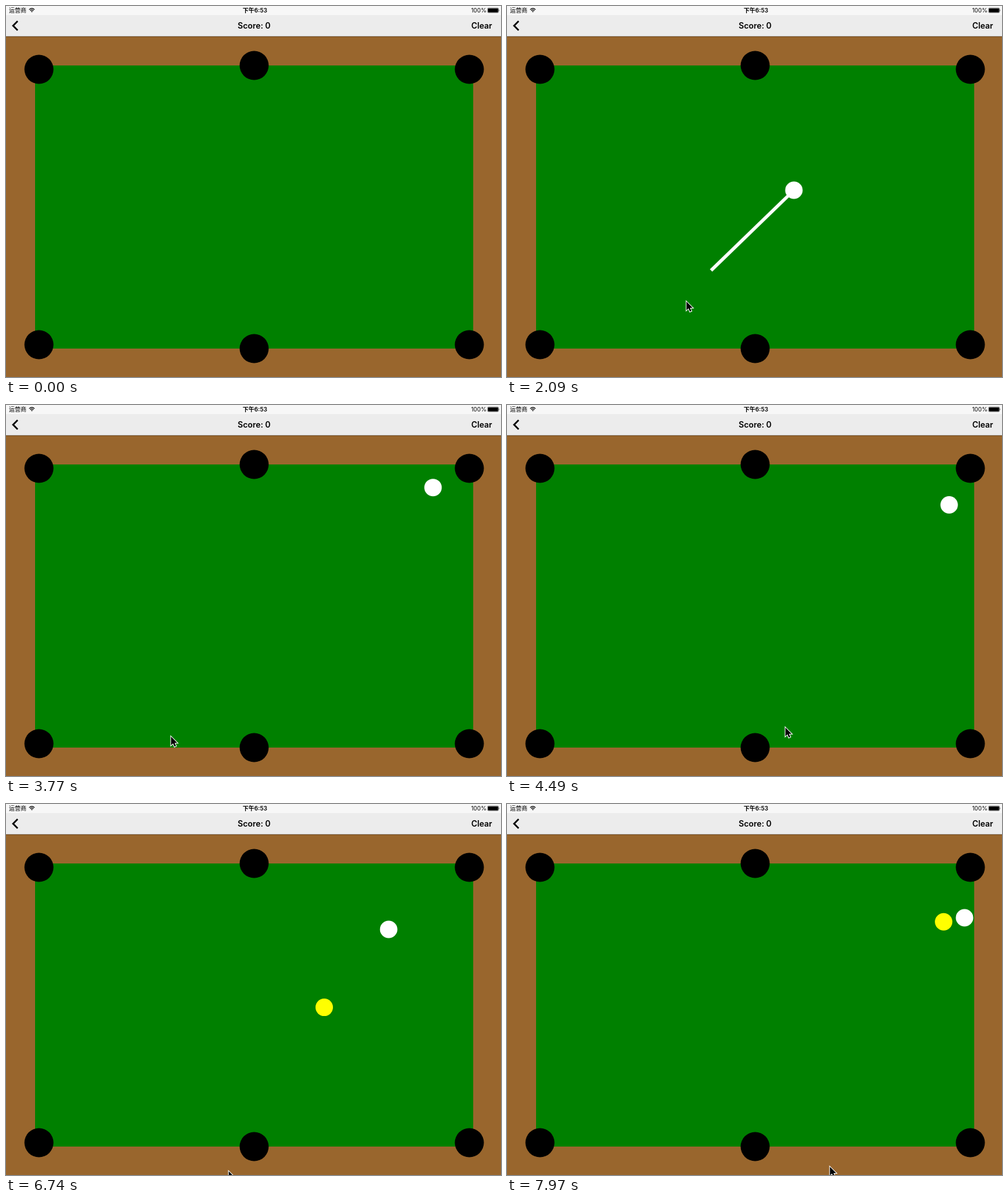
An HTML page with a canvas for the animation above (8 s loop, 766 by 574 pixels).

```html
<!DOCTYPE html>
<html lang="zh">
<head>
<meta charset="utf-8">
<title>Pool table</title>
<style>
  html, body { margin: 0; width: 766px; height: 574px; overflow: hidden; background: #99662d; }
  canvas, svg { position: absolute; left: 0; top: 0; display: block; }
  text { font-family: Inter, "Noto Sans CJK SC", "Noto Sans CJK", sans-serif; fill: #000; }
  .status { font-size: 9px; }
  .bar { font-size: 12.6px; font-weight: 600; }
</style>
</head>
<body>
<canvas id="stage" width="766" height="574"></canvas>
<svg width="766" height="48" viewBox="0 0 766 48">
  <rect width="766" height="14" fill="#f7f7f7"/>
  <rect y="14" width="766" height="33" fill="#ececec"/>
  <rect y="46.7" width="766" height="0.8" fill="#000" opacity="0.45"/>
  <text class="status" x="4.5" y="10">运营商</text>
  <g fill="none" stroke="#000" stroke-width="1.2">
    <path d="M35.8 5.6Q40 1.8 44.2 5.6"/>
    <path d="M37.4 7.3Q40 5 42.6 7.3"/>
  </g>
  <path d="M38.6 8.3Q40 7.2 41.4 8.3L40 9.8Z"/>
  <text class="status" x="385.3" y="10" text-anchor="middle" font-weight="600">下午6:53</text>
  <text class="status" x="743.5" y="10" text-anchor="end">100%</text>
  <rect x="745.3" y="3.1" width="16.8" height="7.2" rx="1.4" fill="none" stroke="#000" stroke-width="0.5"/>
  <rect x="745.9" y="3.7" width="15.6" height="6" rx="0.8"/>
  <path d="M762.6 5.3Q764.2 6.8 762.6 8.3Z"/>
  <path d="M18 23.3L10.9 30.5L18 37.7" fill="none" stroke="#000" stroke-width="2.5"/>
  <text class="bar" x="384" y="35" text-anchor="middle">Score: 0</text>
  <text class="bar" x="752.3" y="35" text-anchor="end">Clear</text>
</svg>
<script>
const ctx = document.getElementById('stage').getContext('2d');
const LOOP = 8, DAMPING = 0.13, CUE_LAG = 0.2, RADIUS = 13.5;
const ARROW = new Path2D('M.7 1.3V14.6L3.9 11.7L6.1 16.8L8.4 15.8L6.2 10.9H10.3Z');

const point = (t, x, y) => ({ t, x, y });

// turning points of the hand: approach, first aim, move away, second aim, leave
const pointer = [
  point(0.36, 586, 327), point(0.92, 441, 284),
  point(1.28, 441, 285), point(1.89, 316, 409), point(2.09, 277, 456), point(2.91, 252, 512),
  point(3.76, 252, 512), point(4.49, 430, 498), point(5.36, 484, 322),
  point(5.54, 484, 322), point(5.68, 453, 373), point(5.88, 380, 499), point(6.24, 344, 567),
  point(7.3, 344, 567), point(7.97, 499, 560)
];

// each path: the shot, then every place the ball hits something
const kiss = 6.93;
const balls = [
  { color: '#fff', shown: 1.28, path: [
    point(3.115, 444, 285), point(3.53, 597.3, 107.3), point(3.963, 710, 143.4),
    point(kiss, 585.6, 196.8), point(7.96, 708, 176)] },
  { color: '#ff0', shown: 5.52, path: [
    point(6.727, 487.5, 323), point(kiss, 558.5, 203),
    point(7.125, 603, 106.5), point(7.97, 675.7, 182.2)] }
];

const steady = s => s;
const rolled = s => 1 - Math.exp(-DAMPING * s);

function along(path, t, travel) {
  const next = path.findIndex(p => p.t > t);
  if (next < 0) return path[path.length - 1];
  if (next === 0) return path[0];
  const a = path[next - 1], b = path[next];
  const f = travel(t - a.t) / travel(b.t - a.t);
  return point(t, a.x + (b.x - a.x) * f, a.y + (b.y - a.y) * f);
}

function disc(x, y, r, color) {
  ctx.fillStyle = color;
  ctx.beginPath();
  ctx.arc(x, y, r, 0, Math.PI * 2);
  ctx.fill();
}

function drawTable() {
  ctx.fillStyle = '#99662d';
  ctx.fillRect(0, 0, 766, 574);
  ctx.fillStyle = '#008000';
  ctx.fillRect(45, 92, 678, 438);
  for (const col of [-1, 0, 1]) {
    for (const row of [-1, 1]) {
      disc(384 + col * 333, 311 + row * (col ? 213 : 219), 22.5, '#000');
    }
  }
}

function drawBall({ color, shown, path }, t) {
  if (t < shown) return;
  const ball = along(path, t, rolled);
  if (t < path[0].t) {
    // the cue trails the pointer
    const tip = along(pointer, Math.max(shown, t - CUE_LAG), steady);
    ctx.strokeStyle = '#fff';
    ctx.lineWidth = 5.2;
    ctx.beginPath();
    ctx.moveTo(ball.x, ball.y);
    ctx.lineTo(tip.x, tip.y);
    ctx.stroke();
  }
  disc(ball.x, ball.y, RADIUS, color);
}

function drawPointer(t) {
  if (t < pointer[0].t) return;
  const { x, y } = along(pointer, t, steady);
  ctx.save();
  ctx.translate(x, y);
  ctx.strokeStyle = '#fff';
  ctx.lineWidth = 2;
  ctx.stroke(ARROW);
  ctx.fillStyle = '#000';
  ctx.fill(ARROW);
  ctx.restore();
}

const start = performance.now();
function tick() {
  const t = (performance.now() - start) / 1000 % LOOP;
  drawTable();
  balls.forEach(ball => drawBall(ball, t));
  drawPointer(t);
  requestAnimationFrame(tick);
}
tick();
</script>
</body>
</html>
```
